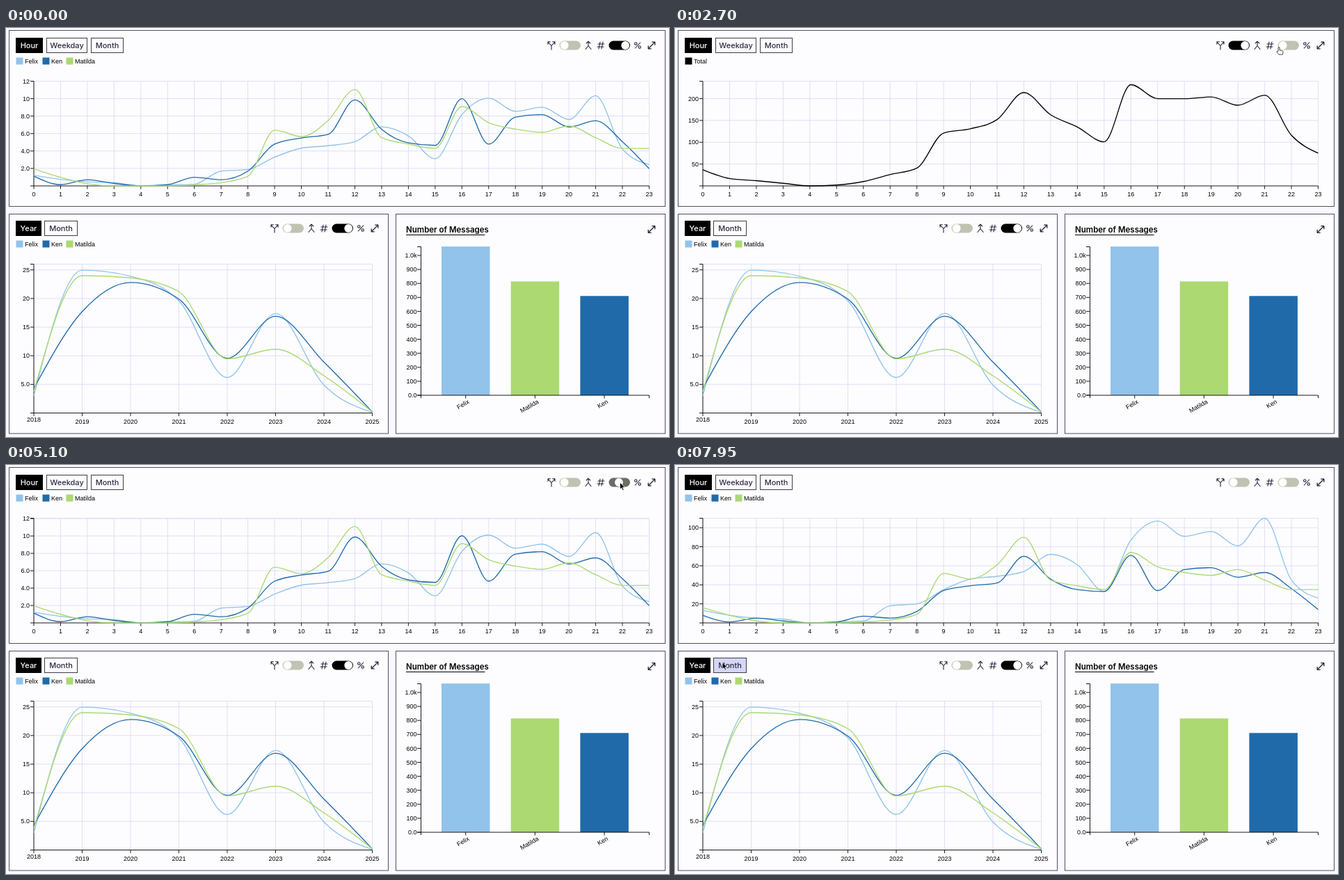
Animation of 953x588 px, one loop 8000 ms. Source, as an HTML page:

```html
<!DOCTYPE html>
<html lang="en">
<head>
<meta charset="utf-8">
<title>Message charts</title>
<style>
html, body { margin: 0; width: 100%; height: 100%; overflow: hidden; background: #f9f9ff; }
svg { display: block; width: 953px; height: 588px; }
.axis { font: 9px "Liberation Sans", Arial, sans-serif; fill: #000; }
.btn { font: 500 11px Inter, sans-serif; text-anchor: middle; }
.title { font: 600 11.5px Inter, sans-serif; }
.mid { text-anchor: middle; }
.end { text-anchor: end; }
.ink { stroke: #000; fill: none; }
.grid { stroke: #dedef7; fill: none; }
.icon { stroke: #23233a; stroke-width: 1.1; fill: none; stroke-linecap: round; stroke-linejoin: round; }
.curve { fill: none; stroke-width: 1.35; }
</style>
</head>
<body>
<svg id="stage" viewBox="0 0 953 588">
  <defs><clipPath id="plot"><rect x="0" y="57" width="953" height="190"/></clipPath></defs>
  <g id="base"></g>
  <g id="live"></g>
</svg>
<script>
const LOOP = 8000, FADE = 1000, FLIP = 300;
const base = document.getElementById('base'), live = document.getElementById('live');

const people = [
  { name: 'Felix', color: '#92c3ea',
    hours: [13, 8, 5, 4, 0, 1, 2, 18, 20, 35, 46, 49, 54, 72, 61, 33, 87, 107, 91, 96, 81, 110, 45, 26],
    years: [3, 24.95, 23.9, 19.6, 6.2, 17.4, 4.9, 0.1] },
  { name: 'Ken', color: '#206aaa',
    hours: [8, 1, 5, 2, 0, 1, 7, 5, 12, 34, 39, 42, 70, 46, 35, 33, 71, 34, 56, 58, 48, 53, 36, 14],
    years: [4.3, 17.7, 22.8, 19.9, 9.55, 16.9, 8.9, 0.2] },
  { name: 'Matilda', color: '#acd972',
    hours: [16, 8, 2, 0, 0, 0, 1, 3, 9, 52, 46, 61, 90, 45, 39, 35, 74, 59, 53, 50, 56, 45, 35, 35],
    years: [3.7, 24, 23.6, 21.2, 9.45, 11.15, 6.5, 0.2] }
];
const total = { name: 'Total', color: '#000', hours: people[0].hours.map((_, i) => people.reduce((s, p) => s + p.hours[i], 0)) };
const sum = a => a.reduce((s, v) => s + v, 0);
const range = (n, step) => Array.from({ length: n }, (_, i) => (i + 1) * step);
const label = v => v >= 1000 ? (v / 1000).toFixed(1) + 'k' : v < 10 ? v.toFixed(1) : String(v);

// Value axis of each chart mode
const modes = {
  percent: { max: 12, ticks: range(6, 2) },
  count: { max: 110, ticks: range(5, 20) },
  total: { max: 240, ticks: range(4, 50) }
};
const clicks = [[-5000, 'percent'], [1016, 'total'], [3142, 'percent'], [5000, 'count']];

const HOUR = { left: 40, right: 924.5, top: 76.5, bottom: 227 };
const YEAR = { left: 40, right: 526.5, top: 339.5, bottom: 553.5 };

const clamp = v => Math.max(0, Math.min(1, v));
const mix = (a, b, p) => a + (b - a) * p;
const cubic = u => u < .5 ? 4 * u ** 3 : 1 - 4 * (1 - u) ** 3;
const easeOut = u => 1 - (1 - u) ** 2;
const smooth = u => u * u * (3 - 2 * u);

const text = (x, y, s, cls, extra = '') => `<text x="${x}" y="${y}" class="${cls}" ${extra}>${s}</text>`;
const path = (d, cls, extra = '') => `<path d="${d}" class="${cls}" ${extra}/>`;
const rect = (x, y, w, h, fill, extra = '') => `<rect x="${x}" y="${y}" width="${w}" height="${h}" fill="${fill}" ${extra}/>`;

// Monotone cubic through evenly spaced points
function curve(ys, left, step) {
  const n = ys.length, d = ys.slice(1).map((y, i) => (y - ys[i]) / step);
  const m = ys.map((_, i) => {
    if (!i || i === n - 1) return 0;
    const a = d[i - 1], b = d[i];
    return (Math.sign(a) + Math.sign(b)) * Math.min(Math.abs(a), Math.abs(b), Math.abs(a + b) / 4);
  });
  m[0] = (3 * d[0] - m[1]) / 2;
  m[n - 1] = (3 * d[n - 2] - m[n - 2]) / 2;
  const h = step / 3;
  let s = `M${left},${ys[0].toFixed(2)}`;
  for (let i = 1; i < n; i++) {
    const x = left + i * step;
    s += `C${x - step + h},${(ys[i - 1] + m[i - 1] * h).toFixed(2)} ${x - h},${(ys[i] - m[i] * h).toFixed(2)} ${x},${ys[i].toFixed(2)}`;
  }
  return s;
}

function plotCurve(box, values, scale, color) {
  const step = (box.right - box.left) / (values.length - 1);
  return path(curve(values.map(v => box.bottom - v * scale), box.left, step), 'curve', `stroke="${color}"`);
}

function columns(box, names, labelY) {
  const step = (box.right - box.left) / (names.length - 1);
  return names.map((s, i) => {
    const x = box.left + i * step;
    return path(`M${x},${box.top}V${box.bottom}`, 'grid') + text(x, labelY(i), s, 'axis mid');
  }).join('') + path(`M${box.left},${box.top}H${box.right}`, 'grid');
}

function axes(box, count) {
  const step = (box.right - box.left) / (count - 1);
  let d = `M${box.left - 5},${box.top}H${box.left}V${box.bottom}H${box.left - 5}M${box.left},${box.bottom}H${box.right}`;
  for (let i = 0; i < count; i++) d += `M${box.left + i * step},${box.bottom}v4.5`;
  return path(d, 'ink', 'stroke-width=".9"');
}

function rowTick(box, y, v, opacity = 1) {
  return `<g opacity="${opacity.toFixed(3)}">` + path(`M${box.left},${y}H${box.right}`, 'grid') +
    path(`M${box.left - 5},${y}h5`, 'ink', 'stroke-width=".9"') + text(box.left - 6, y + 3.1, label(v), 'axis end') + '</g>';
}

function button(x, y, w, s, fill, ink) {
  return rect(x + .5, y + .5, w - 1, 21, fill, `stroke="${fill === '#000' ? '#000' : '#3c3c46'}"`) +
    text(x + w / 2, y + 15, s, 'btn', `fill="${ink}" ${fill === '#000' ? 'font-weight="600"' : ''}`);
}

const expand = (x, y) => path(`M${x - 4.5},${y + 4.5}L${x + 4.5},${y - 4.5}M${x + .8},${y - 4.8}h4v4M${x - .8},${y + 4.8}h-4v-4`, 'icon', 'style="stroke-width:1.3"');

function tools(x, y) {
  const split = `M${x},${y + 6}v-5.5l-4.8,-5.2M${x},${y + .5}l4.8,-5.2M${x - 5},${y - 1.8}v-3.4h3.4M${x + 5},${y - 1.8}v-3.4h-3.4`;
  const mx = x + 53, hx = x + 71, px = x + 124;
  const merge = `M${mx},${y - 5.5}v6l-4,5M${mx},${y + .5}l4,5M${mx - 2.8},${y - 3}l2.8,-2.8l2.8,2.8`;
  const hash = `M${hx - 1},${y - 5}l-2,10M${hx + 3},${y - 5}l-2,10M${hx - 4},${y - 2}h9M${hx - 5},${y + 2}h9`;
  return path(split + merge + hash, 'icon') +
    path(`M${px + 3.7},${y - 4}l-7.4,8`, 'icon') +
    `<circle cx="${px - 2.7}" cy="${y - 2.5}" r="1.7" class="icon"/><circle cx="${px + 2.7}" cy="${y + 2.5}" r="1.7" class="icon"/>` +
    expand(x + 144, y);
}

function toggle(x, y, on) {
  const c = [194, 194, 178].map(v => Math.round(mix(v, 0, on)));
  return rect(x, y - 6.5, 30.5, 13, `rgb(${c})`, 'rx="6.5"') +
    `<circle cx="${mix(x + 7.2, x + 23.7, on)}" cy="${y}" r="5.9" fill="#fff"/>`;
}

function legend(y, list) {
  const xs = [14.5, 52.5, 86.5];
  return list.map((p, i) => rect(xs[i], y, 10, 10, p.color) + text(xs[i] + 12.5, y + 8.6, p.name, 'axis')).join('');
}

function barChart() {
  const k = .201, left = 596.5, bottom = 528;
  let s = '', d = `M591,314.5H${left}V${bottom}H591M${left},${bottom + 4}V${bottom}H924.5v4`;
  [0, ...range(10, 100)].forEach(v => {
    const y = bottom - v * k;
    d += `M591,${y}h5.5`;
    s += text(590.5, y + 3.1, label(v), 'axis end');
  });
  [people[0], people[2], people[1]].forEach((p, i) => {
    const x = 626 + i * 99.7, h = sum(p.hours) * k, c = x + 34.7;
    s += rect(x, bottom - h, 69.5, h, p.color) +
      text(c + 6, bottom + 11, p.name, 'axis end', `transform="rotate(-30 ${c + 6} ${bottom + 11})"`);
    d += `M${c},${bottom}v4.5`;
  });
  return s + path(d, 'ink', 'stroke-width=".9"');
}

function drawBase() {
  const frame = (x, y, w, h) => rect(x, y, w, h, '#fdfdff', 'stroke="#50505f"');
  const yearScale = 8.23;
  base.innerHTML = rect(0, 0, 953, 588, '#f9f9ff') +
    frame(4.5, 3.5, 943, 253) + frame(4.5, 267.5, 545, 315.5) + frame(560.5, 267.5, 387, 315.5) +
    button(14, 14, 39, 'Hour', '#000', '#fff') + button(58, 14, 59, 'Weekday', '#fdfdff', '#2a2a40') +
    button(122, 14, 47, 'Month', '#fdfdff', '#2a2a40') + button(14, 277, 37, 'Year', '#000', '#fff') +
    tools(784, 25) + tools(386, 288) + toggle(397.5, 288, 0) + toggle(468.5, 288, 1) +
    legend(305.5, people) +
    columns(HOUR, Array.from({ length: 24 }, (_, i) => i), () => 242.2) +
    columns(YEAR, Array.from({ length: 8 }, (_, i) => 2018 + i), i => i ? 568.8 : 565.8) +
    range(5, 5).map(v => rowTick(YEAR, YEAR.bottom - v * yearScale, v)).join('') +
    axes(YEAR, 8) + people.map(p => plotCurve(YEAR, p.years, yearScale, p.color)).join('') +
    text(575, 294, 'Number of Messages', 'title') + path('M575,297.5H688.5', 'ink') +
    expand(928, 289.5) + barChart();
}

const height = HOUR.bottom - HOUR.top;
function scaleOf(series, mode) {
  if ((series === total) !== (mode === 'total')) return 0;
  return height / modes[mode].max * (mode === 'percent' ? 100 / sum(series.hours) : 1);
}

function hourChart(from, to, p) {
  let s = '';
  const ticks = (mode, opacity) => modes[mode].ticks.forEach(v => {
    const y = HOUR.bottom - v * height * mix(1 / modes[from].max, 1 / modes[to].max, p);
    if (y > 40 && opacity > 0) s += rowTick(HOUR, y, v, opacity);
  });
  if (from !== to) ticks(from, 1 - p);
  ticks(to, p);
  s += axes(HOUR, 24);
  [...people, total].forEach(q => {
    const k = mix(scaleOf(q, from), scaleOf(q, to), p);
    if (k > 0) s += plotCurve(HOUR, q.hours, k, q.color);
  });
  return `<g clip-path="url(#plot)">${s}</g>`;
}

// Pointer stops: time, x, y
const stops = [[450, 822, -20], [880, 810, 27], [2150, 810, 27], [2600, 868, 27], [2750, 868, 27], [3050, 882.5, 25],
  [5150, 882.5, 25], [5700, 890, -20], [7150, -15, 305], [7650, 68, 283.5], [8000, 68, 283.5]];

function pointerAt(t) {
  const i = stops.findIndex(k => k[0] > t);
  if (i < 1) return null;
  const [a, b] = [stops[i - 1], stops[i]], u = smooth((t - a[0]) / (b[0] - a[0]));
  if (a[2] < 0 && i > 1 || b[0] === 7150) return null;
  return [mix(a[1], b[1], u), mix(a[2], b[2], u)];
}

function pointer([x, y], hand) {
  const d = hand
    ? 'M-1,1q1,-1.4 2,0v4l3.5,.6q2,.4 1.6,2.4l-.8,3.2h-5.4l-3,-4q0,-1.4 2.1,-.4z'
    : 'M0,0v10l2.3,-2.1l1.7,3.7l1.7,-.8l-1.7,-3.5h3.2z';
  return `<path transform="translate(${x} ${y})" d="${d}" fill="${hand ? '#fff' : '#000'}" stroke="${hand ? '#222' : '#fff'}" stroke-width=".8"/>`;
}

function draw(t) {
  let i = clicks.length - 1;
  while (clicks[i][0] > t) i--;
  const [start, to] = clicks[i], from = i ? clicks[i - 1][1] : to;
  const p = cubic(clamp((t - start) / FADE)), flip = easeOut(clamp((t - start) / FLIP));
  const on = mode => mix(+(from === mode), +(to === mode), flip);
  const pos = pointerAt(t), hover = pos && t > 7000 && pos[0] > 55;
  live.innerHTML = legend(42.5, to === 'total' ? [total] : people) +
    toggle(795.5, 25, on('total')) + toggle(866.5, 25, on('percent')) +
    hourChart(from, to, p) +
    button(55, 277, 48, 'Month', hover ? '#d5d5f6' : '#fdfdff', '#2a2a40') +
    (pos ? pointer(pos, t > 2450 && t < 3142) : '');
}

drawBase();
const began = performance.now();
function tick() {
  draw((performance.now() - began) % LOOP);
  requestAnimationFrame(tick);
}
draw(0);
requestAnimationFrame(tick);
</script>
</body>
</html>
```
